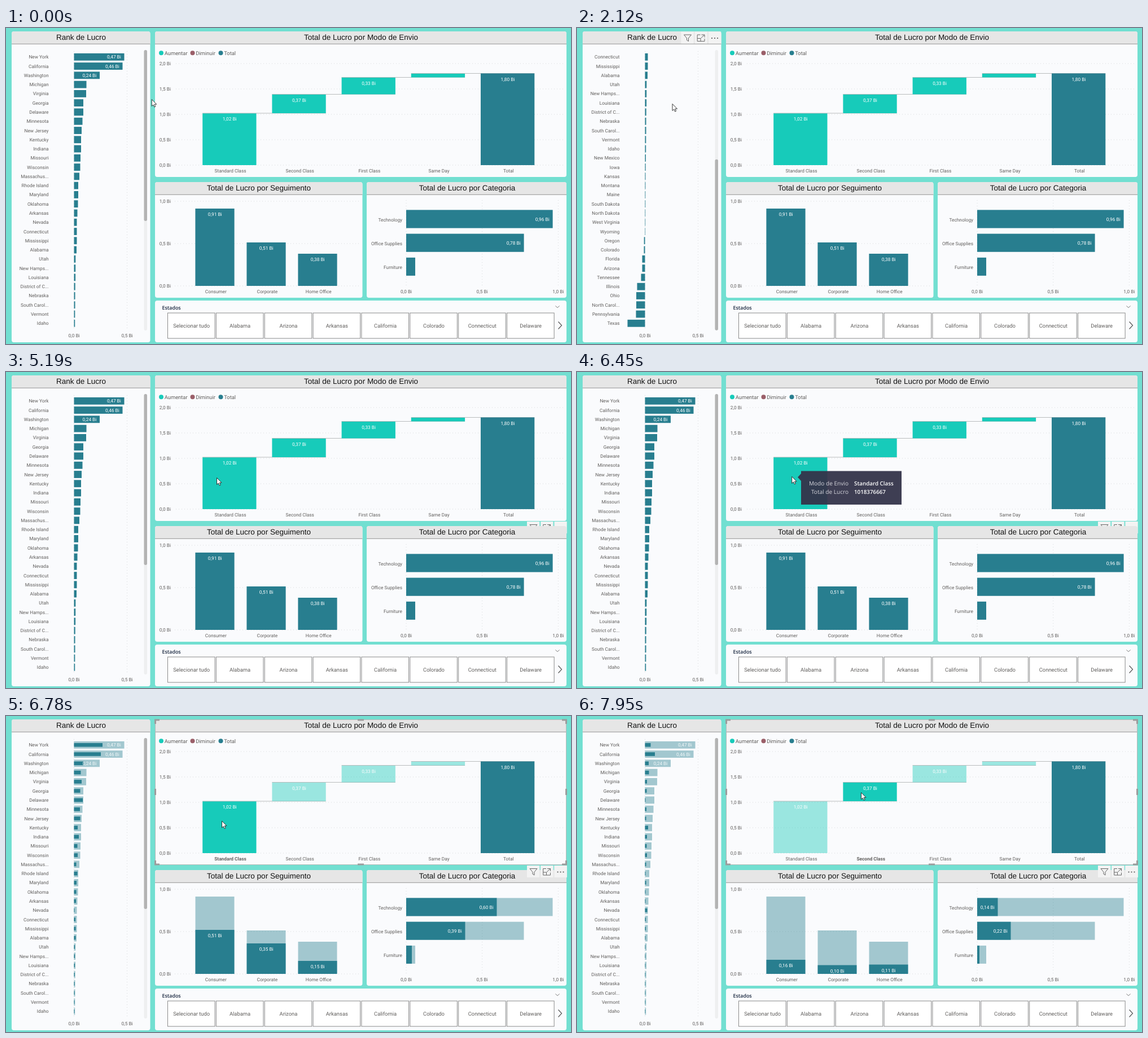
Write an HTML page that moves like this. It is 1001 by 560 pixels and loops after 8000 ms.

```html
<!DOCTYPE html>
<html lang="pt">
<head>
<meta charset="utf-8">
<title>Painel de Lucro</title>
<style>
html, body { margin: 0; width: 100%; height: 100%; overflow: hidden; background: #72dfd1; }
svg { display: block; width: 100vw; height: 100vh; }
text { font: 8.3px Roboto, sans-serif; fill: #605e5c; text-rendering: geometricPrecision; white-space: pre; }
.title { font: 13.5px "Liberation Sans", Arial, sans-serif; fill: #111; }
.mid { font-size: 9.4px; }
.val { fill: #fff; }
.head { font: 600 8.9px "Open Sans", sans-serif; fill: #16243c; }
.tip { font: 10.1px "Open Sans", sans-serif; fill: #d5d5dc; }
.tipv { font: 600 9.8px "Open Sans", sans-serif; fill: #fff; }
.grid { stroke: #d6d8da; stroke-width: 1; stroke-dasharray: 1 4; }
</style>
</head>
<body>
<svg id="stage" viewBox="0 0 1001 560" preserveAspectRatio="none"></svg>
<script>
const LOOP = 8000, TEAL = '#287e8f', GREEN = '#17cbba', FADE = 0.42;
const ROW = 16.276, ZERO = 120.5;
const stage = document.getElementById('stage');

function el(tag, attrs, parent = stage, text) {
  const e = document.createElementNS('http://www.w3.org/2000/svg', tag);
  set(e, attrs);
  if (text !== undefined) e.textContent = text;
  parent.appendChild(e);
  return e;
}
function set(e, attrs) { for (const k in attrs) e.setAttribute(k, attrs[k]); }
const group = (parent = stage) => el('g', {}, parent);
const rect = (x, y, width, height, fill, parent) => el('rect', { x, y, width, height, fill }, parent);
const path = (d, stroke, parent, width = 1) => el('path', { d, stroke, fill: 'none', 'stroke-width': width }, parent);
// y is the vertical centre of the capitals
function label(s, x, y, anchor = 'middle', cls = '', parent, drop = 3) {
  return el('text', { x, y: y + drop, 'text-anchor': anchor, class: cls }, parent, s);
}
const show = (e, on) => set(e, { opacity: +on });
const ramp = (t, a, b) => {
  const p = Math.min(1, Math.max(0, (t - a) / (b - a)));
  return p * p * (3 - 2 * p);
};
const lerp = (a, b, p) => a + (b - a) * p;

function panel(x, y, w, h, title, cx) {
  el('rect', { x, y, width: w, height: h, rx: 4, fill: '#fafbfd' });
  if (!title) return;
  el('path', { d: `M${x} ${y + 22}V${y + 4}q0-4 4-4H${x + w - 4}q4 0 4 4V${y + 22}Z`, fill: '#e6e6e6' });
  path(`M${x} ${y + 22.3}h${w}`, '#949494');
  label(title, cx, y + 10.4, 'middle', 'title', stage, 4.8);
}
const gridLine = (x1, y1, x2, y2) => el('line', { x1, y1, x2, y2, class: 'grid' });

// Hover toolbar: filter, focus mode, more options
function toolbar(x, y, parent) {
  const g = group(parent);
  g.setAttribute('transform', `translate(${x} ${y})`);
  for (let i = 0; i < 3; i++) rect(i * 24.2, 0, 22.3, 21, '#f3f3f3', g);
  path('M5 5.5H18L13 11.5V17L10 15V11.5Z', '#666', g);
  path('M34 5.5H28.700V17H41.500V12.500M36 5.500H41.500V10M41.500 5.500L35 11.500M28.700 12H34.500V17', '#666', g);
  for (let i = 0; i < 3; i++) el('circle', { cx: 54.5 + i * 5, cy: 11.5, r: 1.1, fill: '#555' }, g);
  return g;
}

// Rank panel
panel(10, 6, 245.5, 551, 'Rank de Lucro', 133);
[[ZERO, '0,0 Bi'], [214.5, '0,5 Bi']].forEach(([x, s]) => {
  gridLine(x, 41, x, 535);
  label(s, x, 545);
});
const states = ('New York,California,Washington,Michigan,Virginia,Georgia,Delaware,Minnesota,New Jersey,Kentucky,' +
  'Indiana,Missouri,Wisconsin,Massachus...,Rhode Island,Maryland,Oklahoma,Arkansas,Nevada,Connecticut,Mississippi,' +
  'Alabama,Utah,New Hamps...,Louisiana,District of C...,Nebraska,South Carol...,Vermont,Idaho,New Mexico,Iowa,Kansas,' +
  'Montana,Maine,South Dakota,North Dakota,West Virginia,Wyoming,Oregon,Colorado,Florida,Arizona,Tennessee,Illinois,' +
  'Ohio,North Carol...,Pennsylvania,Texas').split(',');
const full = [89, 86, 45.5, 22, 21.5, 16.5, 16.5, 15, 13.5, 12.5, 12.5, 11.5, 11, 9.5, 7.5, 7.5, 7, 6, 5, 5, 5, 4.5,
  2.8, 2.7, 2.6, 2.2, 2, 2, 1.8, 1.7, 1.5, 1.2, 1, .9, .8, .8, .7, .7, .6, -1.8, -2, -5, -5, -7, -14, -15.5, -15.5, -16, -31];
const partA = [50.5, 47.5, 17, 12, 13.5, 11, 15.5, 10.5, 11, 6.5, 8.5, 6, 6.5, 4, 6, 4.5, 4, 3.5, 1, 2.5, 3, 3];
const partB = [10, 17.5, 6.5, 7, 3.5, 3, 1, 2.5, 2, 5.5, 3.5, 3, 3.5, 2, 1, 2, 1, 1, 4, 1.5, 1.5, 1];
const values = ['0,47 Bi', '0,46 Bi', '0,24 Bi'];
const rows = Array.from({ length: 30 }, (_, i) => {
  const y = 51.3 + i * ROW;
  return {
    y,
    name: label('', 75.5, y, 'end'),
    bar: rect(0, y - 6.4, 0, 12.8, TEAL),
    inner: rect(ZERO, 0, 0, 0, TEAL),
    value: label('', 0, y, 'end', 'val')
  };
});
el('rect', { x: 244.5, y: 39, width: 5.5, height: 497, rx: 2.7, fill: '#eeeff0' });
const thumb = el('rect', { x: 244.5, y: 39, width: 5.5, height: 303, rx: 2.7, fill: '#b3b3b3' });
const rankTools = toolbar(184.5, 6.5);

// Waterfall panel
panel(264, 6, 729, 258, 'Total de Lucro por Modo de Envio', 629);
[['Aumentar', 275, GREEN], ['Diminuir', 330.5, '#9b5f69'], ['Total', 380.5, TEAL]].forEach(([s, x, fill]) => {
  el('circle', { cx: x, cy: 44.3, r: 4, fill });
  label(s, x + 5.7, 44.3, 'start', 'mid', stage, 3.3);
});
['2,0', '1,5', '1,0', '0,5', '0,0'].forEach((s, i) => {
  const y = 63 + i * 45;
  gridLine(301, y, 988, y);
  label(s + ' Bi', 292, y, 'end');
});
const steps = [
  ['Standard Class', 151, 243, '1,02 Bi'], ['Second Class', 117.5, 151, '0,37 Bi'],
  ['First Class', 87.5, 117.5, '0,33 Bi'], ['Same Day', 80.5, 87.5, ''], ['Total', 80.5, 243, '1,80 Bi']
].map(([name, top, bottom, value], i) => {
  const x = 348.2 + i * 123.2, g = group();
  rect(x, top, 95.3, bottom - top, i < 4 ? GREEN : TEAL, g);
  label(value, x + 48, top + 10.3, 'middle', 'val', g);
  if (i < 4) path(`M${x} ${top}h218.500`, '#b3b6b6', stage, .9);
  return { g, name: label(name, x + 49.3, 253) };
});

// Selection frame with corner and side handles
const frame = group();
el('rect', { x: 264.5, y: 6.5, width: 728, height: 257, fill: 'none', stroke: '#b5b8b8' }, frame);
path('M264.500 14V7H272M985 7H992.500V14M992.500 256V263H985M272 263H264.500V256M623 7h11M623 263h11M264.500 129v11M992.500 129v11',
  '#9c9c9c', frame, 3);
const backTools = toolbar(923, 265);

// Segment panel
panel(264, 273, 367.5, 205, 'Total de Lucro por Seguimento', 448);
['1,0', '0,5', '0,0'].forEach((s, i) => {
  const y = 307 + i * 75;
  gridLine(299, y, 626, y);
  label(s + ' Bi', 292, y, 'end');
});
// each bar: extent when whole, first selection, second selection
const segments = [
  ['Consumer', [137, 78, 25], ['0,91', '0,51', '0,16']],
  ['Corporate', [77, 54, 15.5], ['0,51', '0,35', '0,10']],
  ['Home Office', [57, 23, 16.5], ['0,38', '0,15', '0,11']]
].map(([name, size, text], i) => {
  const x = 335.5 + i * 91;
  label(name, x + 36.3, 466.5);
  set(rect(x, 457 - size[0], 69, size[0], TEAL), { opacity: FADE });
  return { size, text, bar: rect(x, 0, 69, 0, TEAL), value: label('', x + 34.7, 0, 'middle', 'val') };
});

// Category panel
panel(639, 273, 354, 205, 'Total de Lucro por Categoria', 817);
['0,0', '0,5', '1,0'].forEach((s, i) => {
  const x = 709 + i * 134.7;
  gridLine(x, 305, x, 457);
  label(s + ' Bi', x, 466.5);
});
const categories = [
  ['Technology', [259.5, 160.5, 36.5], ['0,96', '0,60', '0,14']],
  ['Office Supplies', [208.5, 104.5, 59.5], ['0,78', '0,39', '0,22']],
  ['Furniture', [16, 10, 4], null]
].map(([name, size, text], i) => {
  const y = 322.5 + i * 42.2;
  label(name, 702, y + 17, 'end');
  set(rect(709, y, size[0], 32, TEAL), { opacity: FADE });
  return { size, text, bar: rect(709, y, 0, 32, TEAL), value: label('', 0, y + 16.5, 'end', 'val') };
});
const frontTools = toolbar(923, 265);

// Slicer
panel(264, 483, 729, 74);
label('Estados', 276.5, 495.3, 'start', 'head', stage, 3.2);
path('M973.500 492.300l3.500 3.500l3.500-3.500', '#777');
path('M978.500 520.500l6 6.500l-6 6.500', '#555', stage, 1.2);
['Selecionar tudo', 'Alabama', 'Arizona', 'Arkansas', 'California', 'Colorado', 'Connecticut', 'Delaware'].forEach((s, i) => {
  const x = 286.5 + i * 85.86;
  set(rect(x, 505, 83.6, 45, '#fff'), { stroke: '#8a8a8a' });
  label(s, x + 42.2, 527.3, 'middle', 'mid', stage, 3.4);
});

// Tooltip
const tip = group();
el('path', { d: 'M397 175.500H575V235H397V193L391 186.500L397 180Z', fill: '#34344a', opacity: .95 }, tip);
[['Modo de Envio', 'Standard Class', 198], ['Total de Lucro', '1018376667', 213]].forEach(([k, v, y]) => {
  label(k, 481, y, 'end', 'tip', tip, 3.4);
  label(v, 491, y, 'start', 'tipv', tip, 3.4);
});

// Pointer
const click = el('circle', { r: 10.5, fill: '#ff0', opacity: 0 });
const pointer = el('path', {
  d: 'M0 0V12L2.800 9.500L4.600 13.600L6.600 12.700L4.800 8.700H8.500Z',
  fill: '#fff', stroke: '#222', 'stroke-width': .9, 'stroke-linejoin': 'round'
});
// start, interval, number of hops, destination
const moves = [
  [630, 70, 6, 169, 134.5], [4830, 72, 6, 373.5, 187.5], [5750, 100, 2, 380.7, 185.3],
  [6530, 70, 2, 382.5, 186], [6850, 68, 6, 502.5, 136], [7260, 1, 1, 503.5, 135.7]
];
function pointerAt(t) {
  let x = 258.2, y = 126.5;
  for (const [start, gap, n, tx, ty] of moves) {
    if (t < start) break;
    const p = Math.min(1, (Math.floor((t - start) / gap) + 1) / n);
    x = lerp(x, tx, p);
    y = lerp(y, ty, p);
  }
  return [x, y];
}
function scrollAt(t) {
  if (t < 1240) return 0;
  if (t < 1860) return 2 * Math.min(8, Math.floor((t - 1240) / 68.5) + 1);
  if (t < 2120) return 18;
  if (t < 4040) return 19;
  return Math.max(0, 13 - 6 * Math.floor((t - 4040) / 110));
}

function draw(t) {
  const first = scrollAt(t);
  const pick = t < 6530 ? -1 : t < 7600 ? 0 : 1;
  const a = ramp(t, 6580, 6770), b = ramp(t, 7640, 7880);
  const stageNo = t < 6600 ? 0 : t < 7670 ? 1 : 2;
  const split = a > 0;
  const blend = ([f, p, q]) => lerp(lerp(f, p, a), q, b);

  rows.forEach((r, i) => {
    const k = first + i, w = full[k];
    r.name.textContent = states[k];
    set(r.bar, { x: ZERO + Math.min(0, w), width: Math.abs(w), opacity: split ? FADE : 1 });
    const h = lerp(12.8, 6.6, a);
    set(r.inner, {
      y: r.y - h / 2, height: h, opacity: +split,
      width: Math.max(0, blend([w, partA[k] ?? w * .6, partB[k] ?? .8]))
    });
    r.value.textContent = values[k] || '';
    set(r.value, { x: ZERO + w - 5.7, opacity: split ? .85 : 1 });
  });
  set(thumb, { y: 39 + first * 10.2 });

  steps.forEach((s, i) => {
    show(s.g, 1);
    if (pick >= 0 && i < 4 && i !== pick) set(s.g, { opacity: FADE });
    set(s.name, { 'style': i === pick ? 'font-weight:700' : '' });
  });
  segments.forEach(s => {
    const h = blend(s.size);
    set(s.bar, { y: 457 - h, height: h });
    set(s.value, { y: 457 - h + 13.4 });
    s.value.textContent = s.text[stageNo] + ' Bi';
  });
  categories.forEach(c => {
    const w = blend(c.size);
    set(c.bar, { width: w });
    set(c.value, { x: 709 + w - 5.8 });
    if (c.text) c.value.textContent = c.text[stageNo] + ' Bi';
  });

  const [x, y] = pointerAt(t);
  show(rankTools, t > 600 && x < 255);
  show(backTools, t > 5000 && x > 264);
  show(frontTools, pick >= 0);
  show(frame, pick >= 0);
  set(tip, { opacity: t < 5750 || t >= 6530 ? 0 : t < 5850 ? .5 : 1 });
  const pressed = (t >= 5650 && t < 5750) || (t >= 7460 && t < 7600);
  set(click, { cx: x, cy: y, opacity: pressed ? .47 : 0 });
  set(pointer, { transform: `translate(${x} ${y})` });
}

const began = performance.now();
function tick() {
  draw((performance.now() - began) % LOOP);
  requestAnimationFrame(tick);
}
tick();
</script>
</body>
</html>
```
